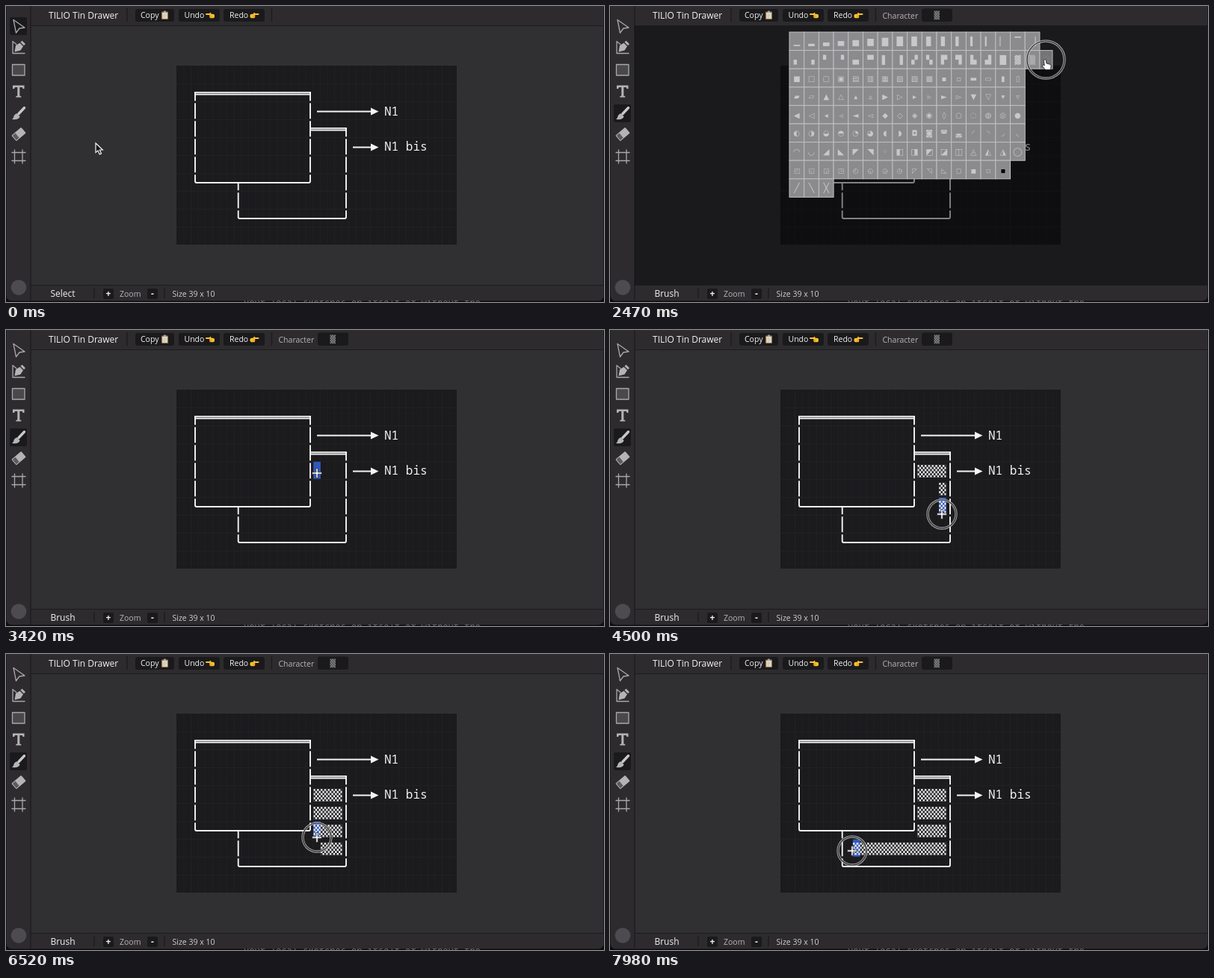
Recreate the animation shown at these times as an HTML page. Size 800 by 397 pixels, loop 8 s.

```html
<!DOCTYPE html>
<html lang="en">
<head>
<meta charset="utf-8">
<title>Text drawing tool</title>
<style>
  html, body { margin: 0; width: 100%; height: 100%; overflow: hidden; background: #0f0d10; }
  svg { display: block; width: 800px; height: 397px; }
  text { font: 10.5px "Open Sans", "Noto Sans", sans-serif; fill: #f2f1f3; }
  .big { font-size: 12px; }
  .dim { fill: #b7b5b9; }
  .mono { font: 500 16px "Noto Sans Mono", "DejaVu Sans Mono", monospace; }
  .glyph { font-family: "DejaVu Sans", sans-serif; fill: #c8c7c9; text-anchor: middle; }
  .btn { fill: #1a191b; }
  .sep { stroke: #1b1a1c; stroke-width: 1.2; }
  .line { fill: none; stroke: #f4f4f4; stroke-width: 1.9; }
  .icon { fill: none; stroke: #a9a8ab; stroke-width: 1.3; stroke-linejoin: round; stroke-linecap: round; }
  .solid { fill: #b4b3b6; stroke: none; }
</style>
</head>
<body>
<svg viewBox="0 0 800 397">
  <defs>
    <pattern id="shade" width="4.8" height="5.6" patternUnits="userSpaceOnUse">
      <path d="M.1 .1h2.300v2.600h-2.300zM2.500 2.900h2.300v2.600h-2.300z" fill="#f6f6f6"/>
    </pattern>
    <g id="hand">
      <path d="M0 2.600Q0 1.600 1 1.600H5L6.500.4 7.500 1.500 7 2.200 11 2.600Q12 3 12 4.500V6Q12 8 10 8H7Q5.300 8 5.300 6.500V3.600H1Q0 3.600 0 2.600z" fill="#fbc02d"/>
      <path d="M5.600 5h3M5.800 6.500h2.800" stroke="#c98a12" stroke-width=".6"/>
    </g>
  </defs>

  <text class="mono" x="318" y="402" style="font-size:12px;font-weight:400;fill:#77757a">your local sketches on itself or without the</text>
  <path d="M1 0H799V388q0 7-7 7H8q-7 0-7-7z" fill="#2d2b2e" stroke="#3a383c" stroke-width=".6"/>
  <path d="M33 27H799V374H33z" fill="#302f32"/>
  <path class="sep" d="M33 0V395M33 26.500H799M33 374.500H799" fill="none"/>
  <path class="sep" d="M162 3V21M355.500 3V21M118 378V392M212 378V392"/>

  <text class="big" x="57" y="17">TILIO Tin Drawer</text>
  <g class="btn">
    <rect x="173" y="4" width="52" height="17" rx="3"/>
    <rect x="231" y="4" width="55" height="17" rx="3"/>
    <rect x="291" y="4" width="55" height="17" rx="3"/>
    <rect x="130" y="379" width="14" height="14" rx="2"/>
    <rect x="189" y="379" width="14" height="14" rx="2"/>
  </g>
  <text x="180" y="16">Copy</text>
  <text x="238.500" y="16">Undo</text>
  <text x="299" y="16">Redo</text>
  <rect x="208" y="7.500" width="9" height="10.500" rx="1" fill="#a8763e"/>
  <path d="M209.300 9h6.400v7.800h-6.400z" fill="#e6e9e4"/>
  <path d="M211 6.500h3v2.400h-3z" fill="#9aa3a8"/>
  <path d="M210.400 11h4.200M210.400 13h4.200M210.400 15h3" stroke="#93a592" stroke-width=".7"/>
  <use href="#hand" transform="translate(267 8.300)"/>
  <use href="#hand" transform="translate(338.500 8.300) scale(-1 1)"/>

  <text class="big" id="tool" x="76" y="390" text-anchor="middle">Select</text>
  <text x="137" y="390" text-anchor="middle" style="font-size:12px;font-weight:700">+</text>
  <text x="196" y="389.500" text-anchor="middle" style="font-size:12px;font-weight:700">-</text>
  <text class="dim" x="152" y="389.500">Zoom</text>
  <text x="222.500" y="389.500" style="fill:#cfced1">Size 39 x 10</text>

  <g id="option">
    <text class="dim" x="364.500" y="16.500">Character</text>
    <rect id="pick" x="417" y="3.500" width="41" height="17.500" rx="3"/>
    <rect id="sample" width="12" height="19" fill="url(#shade)" transform="translate(433.500 6.500) scale(.62)"/>
  </g>

  <rect id="active" class="btn" x="5" width="23" height="24" rx="2"/>
  <g class="icon">
    <path d="M10 18.500L25 29l-7 1-4.500 6z"/>
    <path d="M9 47.500V63.500H25M9 47.500l5 4"/>
    <path class="solid" d="M11.500 61.500l1.500-8.500 5.500-3.500 4.500 4.500-3.500 5.500zM19.500 48.500l2-2 4.500 4.500-2 2z"/>
    <path d="M8.500 78.500h16.500v14.500H8.500z" fill="#49484b"/>
    <path class="solid" d="M9 106.500h15.500v4.500h-2l-.8-2h-3.400v11.500l2 .5v1.500h-7V121l2-.5V109h-3.400l-.8 2H9z"/>
    <path d="M24.500 136.500l-7.500 8" stroke="#c8c7ca" stroke-width="3.400"/>
    <path class="solid" d="M14.500 144l4 4q-.5 5-10.500 4 2.500-1.500 2.500-4.500 1.500-3 4-3.500z" fill="#c8c7ca"/>
    <g transform="translate(17 172) rotate(-40)">
      <rect class="solid" x="-8.500" y="-5" width="17" height="10" rx="1"/>
      <rect x="-7.500" y="-4" width="5" height="8" fill="#5c5b5e" stroke="none"/>
    </g>
    <path d="M11.500 193v18M22 193v18M8 196.500h18M8 207.500h18"/>
  </g>
  <circle cx="17" cy="377.500" r="10.300" fill="#4d4b4f"/>

  <rect x="228" y="80" width="375" height="240" fill="#1b1a1c"/>
  <path id="grid" stroke="#212023" fill="none"/>
  <g id="cells"></g>
  <path id="boxes" class="line"/>
  <path class="line" d="M416 141.500h74M464 189.500h26"/>
  <path d="M488 136.500l10.500 5-10.500 5zM488 184.500l10.500 5-10.500 5z" fill="#f4f4f4"/>
  <text class="mono" x="506" y="146.500">N1</text>
  <text class="mono" x="506" y="194.300">N1 bis</text>

  <g id="popup">
    <path d="M33 27H799V374H33z" fill="#020004" opacity=".47"/>
  </g>

  <g id="ring" fill="none">
    <circle stroke="#c4c4c4" stroke-opacity=".75" stroke-width="3.400"/>
    <circle stroke="#2a292c" stroke-width="1.200"/>
  </g>
  <g id="pointer">
    <path id="arrow" d="M0 0V12.500l3-2.600 2.200 5 2.300-1-2.200-4.900H9.300z" fill="#171618" stroke="#f5f5f5" stroke-width="1.200"/>
    <path id="finger" d="M-2.500 1.200Q-2.500-.4-1.200-.4T.3 1.200L1 5l4.500 1.200q1.800.5 1.600 2.400L6.500 13.500H-.5L-4.500 8.800q-.6-1.500 1-1.700l1.700.8z" fill="#fff" stroke="#222" stroke-width=".9"/>
    <path id="cross" d="M-1.200-6.500H1.200V-1.200H6.500V1.200H1.200V6.500H-1.200V1.200H-6.500V-1.200H-1.200z" fill="#fff" stroke="#26262b" stroke-width=".8"/>
  </g>
</svg>

<script>
const LOOP = 8000, CW = 9.6, CH = 24, X0 = 228.9, Y0 = 80.7;
const $ = id => document.getElementById(id);
const add = (parent, tag, attrs, text = '') => {
  const el = document.createElementNS('http://www.w3.org/2000/svg', tag);
  for (const k in attrs) el.setAttribute(k, attrs[k]);
  el.textContent = text;
  parent.append(el);
  return el;
};
const show = (el, on) => { el.style.display = on ? '' : 'none'; };

// Board grid
let d = '';
for (let c = 1; c < 39; c++) d += `M${228.3 + c * CW} 80V320`;
for (let r = 1; r < 10; r++) d += `M228 ${80.5 + r * CH}H603`;
$('grid').setAttribute('d', d);

// Box sides are broken at each text row
const side = (x, top, bottom) => {
  let s = '';
  for (let y = top; y < bottom;) {
    const edge = Y0 + (Math.floor((y - Y0) / CH) + 1) * CH;
    s += `M${x} ${y}V${Math.min(bottom, edge - 1.5)}`;
    y = edge + 1.5;
  }
  return s;
};
const twin = (x1, x2, y) => `M${x1} ${y - 1.3}H${x2}M${x1} ${y + 1.3}H${x2}`;
const base = (x1, x2, y) => `M${x1} ${y - 2}q0 2 2 2H${x2 - 2}q2 0 2-2`;
$('boxes').setAttribute('d',
  twin(252, 408, 117.2) + side(253, 115, 235) + side(407, 115, 235) + base(253, 407, 237) +
  twin(407, 456, 165.2) + side(455, 164, 283) + side(310.7, 237, 283) + base(310.7, 455, 285));

// Character picker
const range = (from, n) => Array.from({ length: n }, (_, i) => String.fromCodePoint(from + i));
const rows = [
  [...range(0x2581, 15), '▔', '▕'],
  [...'▖▗▘▝▄▀▌▐▞▚▛▜▙▟█▓▒░'],
  ...[0x25A0, 0x25B0, 0x25C0, 0x25D0, 0x25E0].map(u => range(u, 16)),
  range(0x25F0, 15),
  range(0x2571, 3)
];
const sizes = [11, 11, 10, 10, 10, 10, 11, 9, 12];
rows.forEach((row, r) => row.forEach((ch, c) => {
  const x = 240 + c * 19.7, y = 35 + r * 24.6;
  const hot = r === 1 && c === 17;
  add($('popup'), 'rect', { x, y, width: hot ? 17 : 19.7, height: 24.6, fill: hot ? '#747376' : '#8b8a8d', stroke: '#c0bfc1', 'stroke-width': 1 });
  const t = add($('popup'), 'text', { class: 'glyph', x: x + 9.9, y: y + 16.3 }, ch + '\uFE0E');
  t.style.fontSize = sizes[r] + 'px';
  if (hot) t.style.fill = '#8b8a8d';
  if (r === 7 && c === 14) t.style.fill = '#000';
}));

// Pointer path: time, x, y
const path = [
  [0, 120, 184], [310, 120, 184], [640, 17, 144], [1070, 17, 144], [1600, 442, 17],
  [1900, 442, 17], [2340, 583, 72], [2700, 583, 72], [3400, 416, 192], [3600, 416, 192],
  [4040, 444, 192], [4330, 445, 221], [4500, 444, 247], [4760, 445, 266], [5130, 424, 265],
  [5400, 425, 241], [5650, 434, 239], [5950, 434, 214], [6300, 416, 212], [6520, 416, 246],
  [6780, 414, 262], [7300, 412, 263], [7640, 401, 263], [7980, 324, 264], [8000, 324, 264]
];
const at = t => {
  const i = Math.max(1, path.findIndex(p => p[0] > t));
  const [t0, x0, y0] = path[i - 1], [t1, x1, y1] = path[i];
  const u = (t - t0) / (t1 - t0), e = u * u * (3 - 2 * u);
  return [x0 + (x1 - x0) * e, y0 + (y1 - y0) * e];
};
const cellAt = ([x, y]) => [Math.floor((x + 2 - X0) / CW), Math.floor((y - Y0) / CH)];

// Each cell is painted when the pressed brush first reaches it
const DRAW = 3560, cells = new Map();
for (let t = DRAW; t < LOOP; t += 5) {
  const [c, r] = cellAt(at(t)), key = c + ',' + r;
  if (cells.has(key)) continue;
  const el = add($('cells'), 'rect', {
    width: CW, height: 16.8, fill: 'url(#shade)',
    transform: `translate(${X0 + c * CW} ${Y0 + r * CH + 4.2})`
  });
  cells.set(key, { t, el });
}
const hover = add($('cells'), 'rect', { width: CW, height: CH - 1, fill: '#2f57bd' });
$('cells').prepend(hover);

const presses = [[640, 690], [1730, 1790], [2360, 2430], [DRAW, LOOP]];
const rings = $('ring').children;

function draw(t) {
  const pos = at(t), [x, y] = pos;
  const brush = t >= 700, open = t >= 1800 && t < 2600;
  const onBoard = x > 228 && x < 603 && y > 80 && y < 320;
  const paint = brush && !open && onBoard;
  const onPick = x > 417 && x < 458 && y < 22;

  $('tool').textContent = brush ? 'Brush' : 'Select';
  $('active').setAttribute('y', brush ? 132 : 15);
  show($('option'), brush);
  $('pick').setAttribute('fill', onPick ? '#363538' : '#1a191b');
  $('sample').setAttribute('opacity', onPick ? .5 : .75);
  show($('popup'), open);

  const [c, r] = cellAt(pos);
  show(hover, paint);
  hover.setAttribute('x', X0 + c * CW);
  hover.setAttribute('y', Y0 + r * CH);
  for (const cell of cells.values()) show(cell.el, t >= cell.t);

  const press = presses.find(p => t >= p[0] && t < p[1] + 170);
  show($('ring'), press);
  if (press) {
    const radius = 19 + 6 * Math.min(1, Math.max(0, (t - press[1]) / 40));
    for (const o of rings) o.setAttribute('r', radius);
    $('ring').setAttribute('transform', `translate(${x} ${y})`);
  }

  const finger = open || onPick || x < 30;
  show($('finger'), finger);
  show($('cross'), paint);
  show($('arrow'), !finger && !paint);
  $('pointer').setAttribute('transform', `translate(${x} ${y})`);
}

function tick() {
  draw(performance.now() % LOOP);
  requestAnimationFrame(tick);
}
tick();
</script>
</body>
</html>
```
